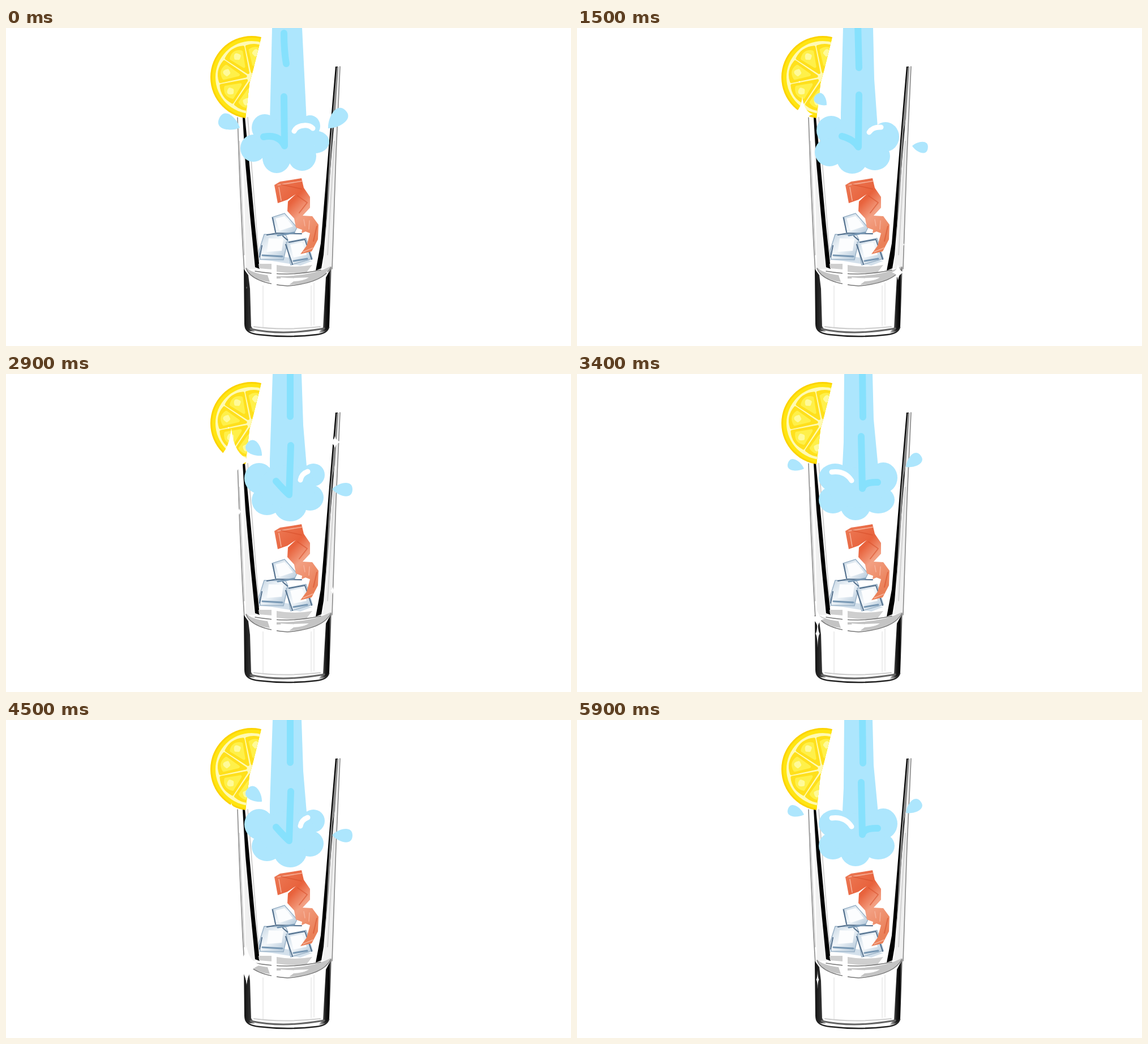
Recreate the animation shown at these times as an HTML page. Size 998x561 px, loop 6.01 s.

```html
<!DOCTYPE html>
<html lang="en">
<head>
<meta charset="utf-8">
<title>Pouring a drink</title>
<style>
  html, body { margin: 0; height: 100%; overflow: hidden; background: #fff; }
  svg { display: block; width: 100vw; height: 100vh; }
  .line { fill: none; stroke-linecap: round; stroke-linejoin: round; }
</style>
</head>
<body>
<svg viewBox="0 0 998 561">
  <defs>
    <clipPath id="cut"><path d="M350 0H454L451 16L436 76L430 98L423 160H350Z"/></clipPath>
    <linearGradient id="ice" x2="1" y2="1">
      <stop offset="0" stop-color="#c3d4e2"/><stop offset=".45" stop-color="#f3f7fa"/><stop offset="1" stop-color="#a9c0d4"/>
    </linearGradient>
    <linearGradient id="peel" x2=".6" y2="1">
      <stop offset="0" stop-color="#ec7c58"/><stop offset=".4" stop-color="#e8623c"/>
      <stop offset=".62" stop-color="#f3a083"/><stop offset="1" stop-color="#ea8058"/>
    </linearGradient>
    <linearGradient id="wallL"><stop offset="0" stop-color="#111"/><stop offset=".6" stop-color="#333"/><stop offset="1" stop-color="#ddd"/></linearGradient>
    <linearGradient id="wallR"><stop offset="0" stop-color="#ddd"/><stop offset=".5" stop-color="#222"/><stop offset=".8" stop-color="#000"/><stop offset="1" stop-color="#999"/></linearGradient>
  </defs>

  <g id="glass">
    <path fill="#f0f0f0" d="M418 158H424L443 425H424Z M582 68H591L575 424H560Z"/>
    <path class="line" stroke="#8a8a8a" stroke-width="1.6" d="M409 158L413 270L418 380L421 430M590 68L583 220L576 425"/>
    <path class="line" stroke="#d2d2d2" stroke-width="2" d="M412 200L421 400M427 158L447 410M580 200L568 400"/>
    <path d="M418 158H422L429 230L440 350L448 425L440 422L431 330L423 240Z"/>
    <path d="M582 68H586L581 150L572 260L561 400L557 424L547 428L556 380L566 260L575 150Z"/>
    <path fill="#888" d="M584 69H587L581 160L577 180L570 300L564 370L572 210Z"/>
    <path fill="#cfcfcf" d="M446 416H471V426L447 424ZM478 418Q510 424 541 418L530 432Q505 434 478 430Z"/>
    <path fill="#c4c4c4" d="M424 422Q432 432 462 436L466 448Q432 444 424 422ZM478 438Q540 438 574 420Q564 450 500 453L508 447Q526 446 535 440L478 442Z"/>
    <path class="line" stroke="#777" stroke-width="1.5" d="M424 424Q434 450 497 455Q560 450 574 422M440 429Q470 434 496 434T556 427"/>
    <path class="line" stroke="#eee" stroke-width="2" d="M454 455V528M539 455V525M544 450V524"/>
    <path fill="url(#wallL)" d="M420 425L428 436L431 460L433 526L440 536L426 534Q421 530 421 522Z"/>
    <path fill="url(#wallR)" d="M575 422L571 526Q570 535 552 538L560 528L565 440Z"/>
    <path class="line" stroke="#222" stroke-width="2.6" d="M423 528Q426 539 447 541Q497 547 548 541Q567 539 570 528"/>
    <path class="line" stroke="#666" stroke-width="3" d="M432 531Q460 537 490 537T562 530"/>
    <path class="line" stroke="#ccc" stroke-width="2" d="M438 527Q490 534 555 527"/>
    <path fill="#fff" d="M469 415H478V455H469ZM485 440L510 442L512 446L487 445Z"/>
  </g>

  <g id="cubes" stroke-linejoin="round">
    <path fill="#d3e0eb" d="M447 402L493 404L541 411L520 419L470 411L447 409Z"/>
    <g fill="url(#ice)" stroke="#9bb3c8" stroke-width="1.5">
      <path d="M470 334L492 327L514 352L509 362L478 367Z"/>
      <path d="M456 364L494 365L498 374L490 409L449 408L447 393Z"/>
      <path d="M495 378L530 371L541 407L503 418Z"/>
    </g>
    <path fill="#fcfdfe" d="M476 336L492 332L507 350L483 358ZM464 371L490 372L487 393L461 395ZM502 382L523 378L531 400L508 405Z"/>
    <path class="line" stroke="#526f8c" stroke-width="2" d="M471 335L476 360M461 365L478 362L522 363M489 367L497 374M500 378L528 373L540 408M452 384L448 404M494 382L506 417"/>
    <path class="line" stroke="#7898b4" stroke-width="3" d="M480 366L509 361M453 401L488 403M508 411L532 407"/>
  </g>

  <g id="twist">
    <path fill="url(#peel)" d="M474 277L484 271L522 265L526 282L537 298L537 317L524 331L541 332L552 347L551 373L540 394L520 399L531 384L537 362L529 359L522 362L523 356L512 352L509 336L497 323L498 306L512 293L497 303L480 309Z"/>
    <path class="line" stroke="#f6b199" stroke-width="1.5" d="M480 277L523 270M482 281L486 304M536 340L535 355M526 338L528 349M525 395L542 388"/>
    <path class="line" stroke="#d9532e" stroke-width="2" opacity=".6" d="M486 276L522 284M515 296L532 308L518 326M549 350L543 376"/>
  </g>

  <g id="lemon" clip-path="url(#cut)">
    <circle cx="434" cy="87" r="73" fill="#fcd303"/>
    <circle cx="434" cy="87" r="70" fill="#ffe512"/>
    <circle cx="434" cy="87" r="64" fill="#fffab4"/>
  </g>
  <g id="stars" fill="#fff"></g>
  <g id="water"></g>
</svg>
<script>
const byId = id => document.getElementById(id);

// Lemon segments: nested rounded wedges around the hub
const wedge = (near, far, spread, color) =>
  `<path fill="${color}" stroke="${color}" stroke-width="5" stroke-linejoin="round"
    d="M${near} 0L${far - 5} ${-spread}Q${far + 5} 0 ${far - 5} ${spread}Z"/>`;
for (let angle = 101; angle < 300; angle += 45) {
  byId('lemon').innerHTML += `<g transform="translate(433 87) rotate(${angle})">
    ${wedge(10, 57, 18, '#ffe01c')}${wedge(23, 52, 11, '#fff04a')}${wedge(40, 48, 4, '#fffa9a')}</g>`;
}

// A drop has its tip at (x, y) and its round end at the given length and angle
const drop = ([x, y, length, width, angle]) =>
  `<path transform="translate(${x} ${y}) rotate(${angle})"
    d="M0 0C${length * .3} ${-width} ${length} ${-width * 1.6} ${length} 0S${length * .3} ${width} 0 0"/>`;
const puff = ([x, y, rx, ry]) => `<ellipse cx="${x}" cy="${y}" rx="${rx}" ry="${ry}"/>`;

const poses = [
  {
    stream: 'M470 0H523L531 165V200H466V165Z',
    puffs: [[457, 176, 23, 24], [437, 212, 23, 24], [478, 229, 25, 27], [523, 226, 25, 26], [545, 201, 26, 20], [537, 173, 18, 19], [494, 197, 52, 38]],
    drops: [[413, 176, 40, 14, 205], [569, 177, 44, 14, -46]],
    flow: 'M491 9Q491 40 495 63M491 121L492 208Q482 187 455 192',
    shine: 'M509 182Q513 173 526 172Q536 171 542 177'
  },
  {
    stream: 'M472 0H522L524 80L532 165V200H467L471 120Z',
    puffs: [[456, 183, 29, 25], [452, 222, 25, 24], [492, 231, 27, 27], [532, 222, 29, 24], [541, 183, 25, 27], [494, 200, 50, 36]],
    drops: [[401, 167, 30, 10, 200], [581, 164, 33, 11, -38]],
    flow: 'M504 -9L505 76M502 110L504 202Q507 190 531 191',
    shine: 'M450 173Q473 170 485 188'
  },
  {
    stream: 'M471 0H522L525 90L532 175V200H466V150Z',
    puffs: [[447, 184, 26, 27], [461, 223, 27, 26], [502, 233, 29, 27], [537, 218, 24, 23], [543, 178, 20, 20], [497, 199, 50, 38]],
    drops: [[452, 144, 34, 12, 222], [576, 203, 36, 12, 2]],
    flow: 'M502 -9V75M503 126L500 213Q492 206 477 189',
    shine: 'M520 187Q522 176 533 172'
  },
  {
    stream: 'M470 0H523L525 90L531 175V200H466V150Z',
    puffs: [[449, 181, 26, 26], [446, 219, 26, 25], [486, 231, 27, 26], [526, 226, 27, 25], [545, 192, 24, 26], [497, 199, 50, 37]],
    drops: [[441, 136, 26, 10, 222], [592, 208, 28, 10, 8]],
    flow: 'M496 -9L498 70M498 118L497 210Q488 196 468 191',
    shine: 'M516 184Q522 174 537 175'
  }
];
byId('water').innerHTML = poses.map(({ stream, puffs, drops, flow, shine }) => `<g>
  <g fill="#ade6fd"><path d="${stream}"/>${puffs.map(puff).join('')}${drops.map(drop).join('')}</g>
  <path class="line" stroke="#86e1fd" stroke-width="12" d="${flow}"/>
  <path class="line" stroke="#fff" stroke-width="9" d="${shine}"/></g>`).join('');
const splashes = [...byId('water').children];

// Glints: x, y, half width, half height, step of the peak, steps to fade
const glints = [
  [398, 152, 34, 56, 5, 4.5], [393, 95, 5, 6, 4, 1.5], [581, 120, 15, 13, 5.5, 2.5],
  [577, 382, 6, 10, 4.5, 2], [412, 243, 5, 6, 5, 1.5], [425, 432, 26, 34, 9, 1.9],
  [425, 458, 4, 28, 10.2, 2], [567, 431, 20, 26, 2, 2.2]
];
byId('stars').innerHTML = '<path d="M0-1Q.14-.14 1 0Q.14 .14 0 1Q-.14 .14-1 0Q-.14-.14 0-1"/>'.repeat(glints.length);
const stars = [...byId('stars').children];

function draw(now) {
  const step = Math.min(59, Math.floor(now % 6010 / 100));
  const pose = Math.floor(step / 2) % 4;
  splashes.forEach((splash, i) => splash.style.display = i === pose ? '' : 'none');
  glints.forEach(([x, y, rx, ry, peak, fade], i) => {
    const gap = Math.abs(step % 12 - peak);
    const size = Math.max(0, 1 - Math.min(gap, 12 - gap) / fade);
    stars[i].setAttribute('transform', `translate(${x} ${y}) scale(${rx * size} ${ry * size})`);
  });
}

const start = performance.now();
function tick() {
  draw(performance.now() - start);
  requestAnimationFrame(tick);
}
tick();
</script>
</body>
</html>
```
